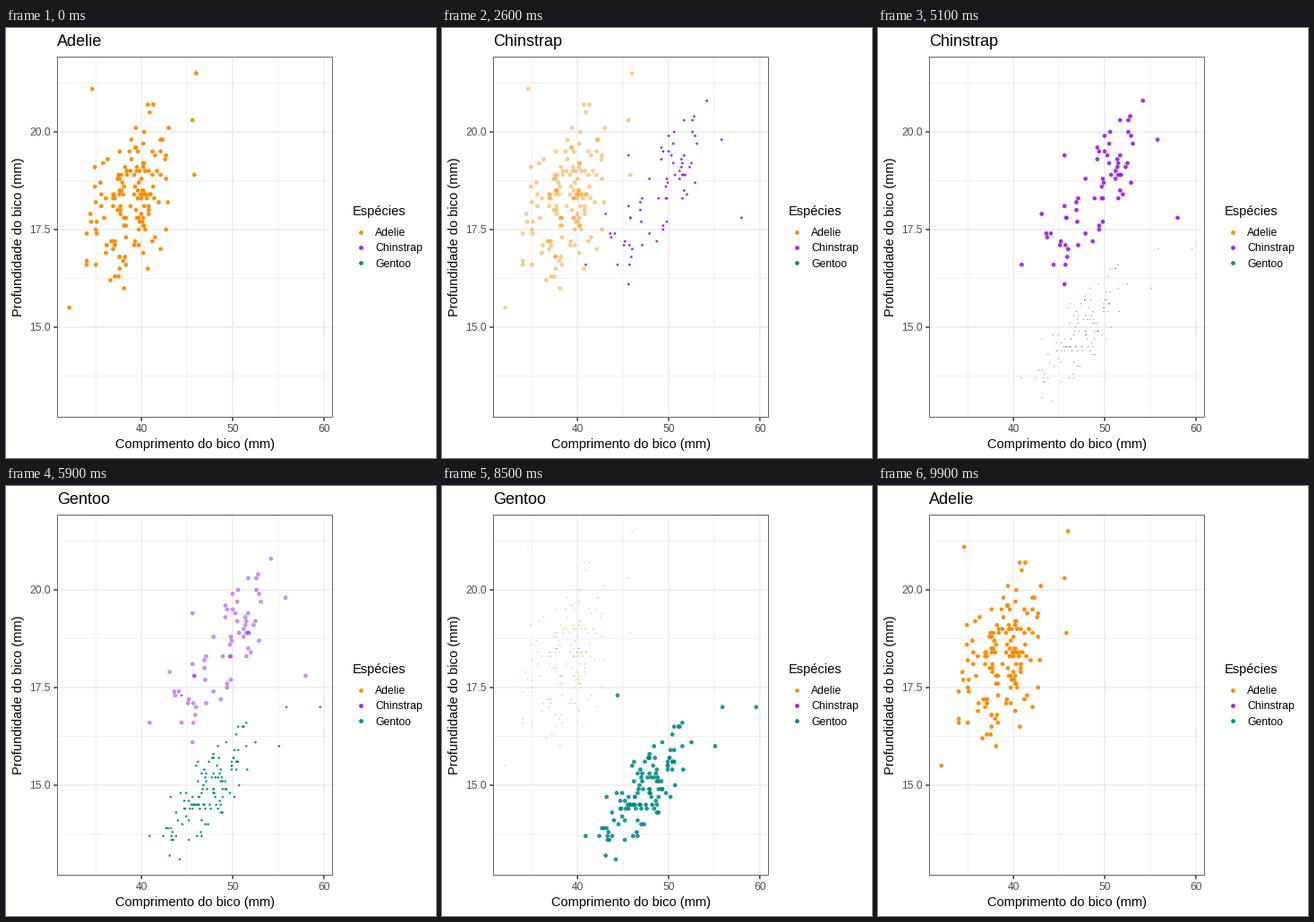
These frames come from a looping animation (480x480 px, 10 s). A matplotlib script:

```python
import matplotlib.pyplot as plt
import numpy as np
from matplotlib.animation import FuncAnimation
from matplotlib.patches import Rectangle

SIZE, DPI = 480, 72          # at 72 dpi one point is one pixel
FRAMES, STEP = 100, 100

plt.rcParams["font.family"] = "Liberation Sans"

DOT, EDGE = 3.91, 0.71
LEFT, TOP, RIGHT, BOTTOM = 57, 32, 365, 435
GRID, TICK, BORDER, TICK_TEXT = "#EBEBEB", "#333333", "#666666", "#4D4D4D"

# A few far points, then clouds: count, mean, spread, correlation
SPECIES = [
    dict(name="Adelie", color="#FF8C00",
         far=[(46.0, 21.5), (45.8, 18.9), (45.6, 20.3), (34.6, 21.1),
              (32.1, 15.5)],
         clouds=[(146, (38.8, 18.3), (2.5, 1.2), 0.35)]),
    dict(name="Chinstrap", color="#A020F0",
         far=[(58.0, 17.8), (55.8, 19.8), (54.2, 20.8), (40.9, 16.6),
              (45.6, 19.4)],
         clouds=[(26, (46.3, 17.6), (1.8, 0.75), 0.2),
                 (37, (51.0, 19.1), (1.1, 0.75), 0.3)]),
    dict(name="Gentoo", color="#008B8B",
         far=[(59.6, 17.0), (55.9, 17.0), (55.1, 16.0), (44.4, 17.3),
              (40.9, 13.7)],
         clouds=[(118, (47.3, 14.9), (2.5, 0.88), 0.7)]),
]
NAMES = [s["name"] for s in SPECIES]

rng = np.random.default_rng(11)


def px(x):
    return 151.2 + (np.asarray(x) - 40) * 10.18


def py(y):
    return 116 - (np.asarray(y) - 20) * 43.6


def cloud(n, mean, spread, r, reach=2.1):
    """Correlated normal points, cut off at a fixed reach."""
    z = rng.normal(size=(4 * n, 2))
    u, v = z[np.hypot(*z.T) < reach][:n].T
    x = mean[0] + spread[0] * u
    y = mean[1] + spread[1] * (r * u + np.sqrt(1 - r * r) * v)
    return np.round(np.column_stack([x, y]), 1)


fig = plt.figure(figsize=(SIZE / DPI, SIZE / DPI), dpi=DPI, facecolor="white")
ax = fig.add_axes([0, 0, 1, 1])
ax.set(xlim=(0, SIZE), ylim=(SIZE, 0))
ax.axis("off")


def line(xs, ys, width, color, z=1):
    ax.plot(xs, ys, color=color, lw=width, zorder=z, snap=False,
            solid_capstyle="butt")


def label(x, y, text, size, color="black", **kw):
    kw = {"ha": "left", "va": "baseline", **kw}
    return ax.text(x, y, text, size=size, color=color, **kw)


def dots(x, y, color):
    return ax.scatter(x, y, s=np.full(len(x), DOT ** 2), c=color,
                      linewidths=EDGE, edgecolors=color, zorder=3)


# Panel grid, ticks and border
for x in (35, 45, 55):
    line([px(x)] * 2, [TOP, BOTTOM], 0.73, GRID)
for y in np.arange(13.75, 22, 2.5):
    line([LEFT, RIGHT], [py(y)] * 2, 0.73, GRID)
for x in (40, 50, 60):
    line([px(x)] * 2, [TOP, BOTTOM], 1.455, GRID, 2)
    line([px(x)] * 2, [BOTTOM, BOTTOM + 3.75], 1.455, TICK, 2)
    label(px(x), 451, str(x), 12, TICK_TEXT, ha="center")
for y in (15, 17.5, 20):
    line([LEFT, RIGHT], [py(y)] * 2, 1.455, GRID, 2)
    line([LEFT - 3.75, LEFT], [py(y)] * 2, 1.455, TICK, 2)
    label(50, py(y) + 4.2, f"{y:.1f}", 12, TICK_TEXT, ha="right")
ax.add_patch(Rectangle((LEFT + 0.5, TOP + 0.5), RIGHT - LEFT - 1,
                       BOTTOM - TOP - 1, fill=False, lw=1, ec=BORDER,
                       snap=False, zorder=6))

# Titles and legend
title = label(LEFT, 20, NAMES[0], 18)
label(210.5, 469, "Comprimento do bico (mm)", 14.6, ha="center")
label(18, 233.5, "Profundidade do bico (mm)", 14.6, ha="center",
      rotation=90, rotation_mode="anchor")
label(387, 209, "Espécies", 14.6)

groups = []
for i, s in enumerate(SPECIES):
    y = 227.7 + 17.28 * i
    dots([395.7], [y], s["color"])
    label(412, y + 4.3, s["name"], 12.3)
    pts = np.vstack([s["far"]] + [cloud(*c) for c in s["clouds"]])
    groups.append(dots(px(pts[:, 0]), py(pts[:, 1]), s["color"]))


def pose(group, scale, alpha, z):
    group.set_visible(scale > 0 and alpha > 0)
    n = len(group.get_offsets())
    group.set_sizes(np.full(n, max(DOT * scale, 1) ** 2))
    group.set_linewidths(EDGE * scale)
    group.set_alpha(alpha)
    group.set_zorder(z)


def draw(frame):
    # Six equal phases: each group holds, then fades as the next one grows
    phase = FRAMES / 6
    now = min(int((frame - 0.5) / (2 * phase)), 2)
    start = int((2 * now + 1) * phase)
    end = min(round((2 * now + 2) * phase), FRAMES - 1)
    nxt = (now + 1) % 3
    p = min(max(0, (frame - start) / (end - start)), 1)
    for group in groups:
        group.set_visible(False)
    pose(groups[now], 1, 1 - p, 3)
    pose(groups[nxt], p, 1, 4)
    title.set_text(NAMES[nxt if p >= 0.5 else now])
    return [*groups, title]


anim = FuncAnimation(fig, draw, frames=FRAMES, interval=STEP,
                     init_func=lambda: draw(0), repeat=True, repeat_delay=0)
plt.show()
```
